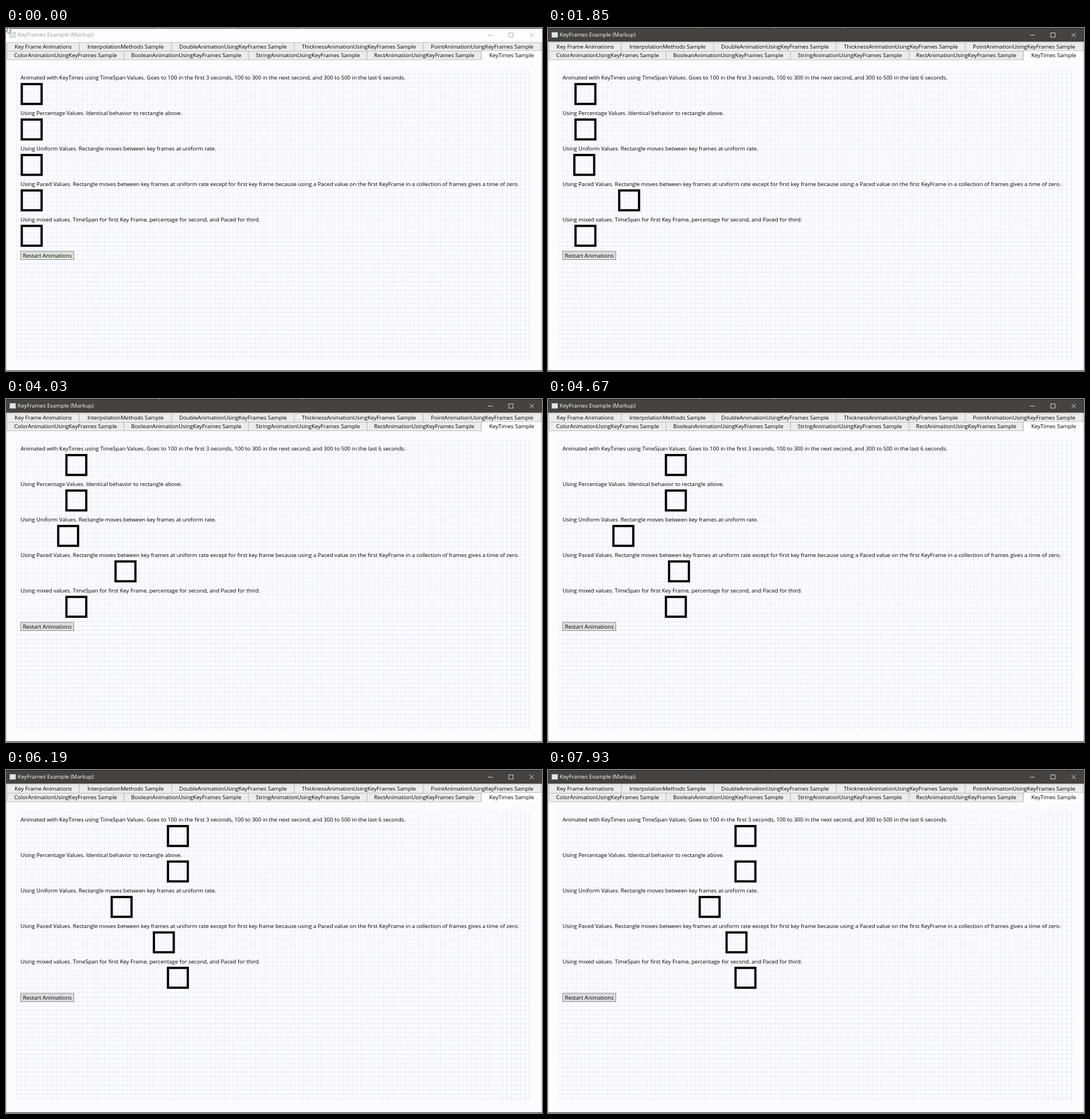
Recreate the animation shown at these times as an HTML page. Size 935 px wide and 599 px high, loop 8 s.

```html
<!DOCTYPE html>
<html lang="en">
<head>
<meta charset="utf-8">
<title>Key frame timing</title>
<style>
html, body { margin: 0; height: 100%; overflow: hidden; background: #fcfcff; }
svg { display: block; width: 935px; height: 599px; }
text { font: 9.585px "Open Sans", "Noto Sans", sans-serif; fill: #000; }
.mid { text-anchor: middle; }
.tab { fill: #ececec; stroke: #b4b4b4; stroke-width: .8; }
.box { fill: none; stroke: #000; stroke-width: 3.9; }
#bar { fill: #454341; }
#title { fill: #fff; }
#controls { fill: none; stroke: #fff; stroke-width: .8; }
#button { fill: #ddd; stroke: #777; stroke-width: .8; }
#cursor { display: none; }
.idle #bar { fill: #fdfdff; }
.idle #title { fill: #999; }
.idle #controls { stroke: #999; }
.idle #button { fill: #dde3da; }
.opening #cursor { display: inline; }
</style>
</head>
<body>
<svg id="stage" viewBox="0 0 935 599">
  <rect width="935" height="599" fill="#fcfcff"/>
  <g id="grid" fill="none" stroke-width=".8"></g>
  <rect id="bar" width="935" height="24"/>
  <rect width="935" height="1" fill="#292824"/>
  <path d="M265 .5h4M393 .5h4M515 .5h4" stroke="#5a521f"/>
  <rect x="6.5" y="7.5" width="10.5" height="9" fill="#dce8e4" stroke="#8fa09b" stroke-width=".5"/>
  <text id="title" x="20.5" y="15.4">KeyFrames Example (Markup)</text>
  <path id="controls" d="M841 12.5h8M877 8.5h7.5v7.5h-7.5zM913.2 8.5l7.6 7.6m0-7.6l-7.6 7.6"/>
  <g id="tabs"></g>
  <path d="M.5 24V599M934.5 24V599" stroke="#b0b0b0" stroke-width=".8"/>
  <path d="M0 598.4H935" stroke="#555" stroke-width="1.2"/>
  <g id="rows"></g>
  <rect id="button" x="25.7" y="390" width="92.5" height="14.6"/>
  <text class="mid" x="72" y="401">Restart Animations</text>
  <path id="cursor" d="M0 5l5 5 4-5H7V0H3v5z" fill="#fff" stroke="#333" stroke-width=".8"/>
</svg>
<script>
const LOOP = 8000, START = 969, FIRST = 120, STEP = 216.9;
const UNIT = 0.771, LEFT = 17.85, ROW = 61.9;
const $ = id => document.getElementById(id);
const stage = $('stage');

// Background grid, ten units per cell
const cell = 10 * UNIT;
let soft = '', strong = '';
for (let x = 18.3; x < 916; x += cell) {
  if (x > 860) strong += `M${x} 72V579`; else soft += `M${x} 72V579`;
}
for (let y = 72.5; y < 580; y += cell) {
  if (y > 373) strong += `M18 ${y}H916`; else soft += `M18 ${y}H916`;
}
$('grid').innerHTML = `<path d="${soft}" stroke="#ebebfd"/><path d="${strong}" stroke="#e3e3fb"/>`;

// Two rows of tabs: edges, then captions
const tabRow = (y, edges, names) => names.map((name, i) => {
  const x = edges[i], w = edges[i + 1] - x;
  return `<rect class="tab" x="${x}" y="${y}" width="${w}" height="15"/>
    <text class="mid" x="${x + w / 2}" y="${y + 10.4}">${name}</text>`;
}).join('');
const using = kind => kind + 'AnimationUsingKeyFrames Sample';
$('tabs').innerHTML =
  tabRow(25.5, [2, 128, 289, 503, 728, 933],
    ['Key Frame Animations', 'InterpolationMethods Sample', using('Double'), using('Thickness'), using('Point')]) +
  tabRow(40.5, [2, 206, 423, 630, 829],
    [using('Color'), using('Boolean'), using('String'), using('Rect')]) +
  `<rect x="829.4" y="39" width="105" height="18" fill="#fdfdff"/>
   <path d="M829.4 55.5V39.4H934.5" fill="none" stroke="#b4b4b4" stroke-width=".8"/>
   <text class="mid" x="882" y="50.9">KeyTimes Sample</text>`;

// Each row: caption and the [seconds, position] keys of its square
const spans = [[0, 10], [3, 100], [4, 300], [10, 500]];
const rows = [
  ['Animated with KeyTimes using TimeSpan Values. Goes to 100 in the first 3 seconds, 100 to 300 in the next second, and 300 to 500 in the last 6 seconds.', spans],
  ['Using Percentage Values. Identical behavior to rectangle above.', spans],
  ['Using Uniform Values. Rectangle moves between key frames at uniform rate.',
    [[0, 10], [10 / 3, 100], [20 / 3, 300], [10, 500]]],
  ['Using Paced Values. Rectangle moves between key frames at uniform rate except for first key frame because using a Paced value on the first KeyFrame in a collection of frames gives a time of zero.',
    [[0, 10], [0, 100], [10, 500]]],
  ['Using mixed values. TimeSpan for first Key Frame, percentage for second, and Paced for third.', spans]
];
$('rows').innerHTML = rows.map(([caption], i) =>
  `<text x="25.5" y="${90.2 + i * ROW}">${caption}</text>
   <rect class="box" y="${98 + i * ROW}" width="34.6" height="34.6"/>`).join('');
const boxes = document.querySelectorAll('.box');

function position(keys, seconds) {
  if (seconds <= 0) return keys[0][1];
  const i = keys.findIndex(key => key[0] > seconds);
  const [t0, p0] = keys[i - 1], [t1, p1] = keys[i];
  return p0 + (p1 - p0) * (seconds - t0) / (t1 - t0);
}

function draw(now) {
  const t = now % LOOP;
  // The screen refreshes in even steps after a short opening hold
  const n = Math.floor((t - FIRST + 10) / STEP);
  const time = t < FIRST ? 0 : FIRST + Math.max(n, 0) * STEP;
  stage.classList.toggle('idle', time < START);
  stage.classList.toggle('opening', t < FIRST);
  boxes.forEach((box, i) =>
    box.setAttribute('x', LEFT + 1.95 + UNIT * position(rows[i][1], (time - START) / 1000)));
  requestAnimationFrame(draw);
}
draw(performance.now());
</script>
</body>
</html>
```
